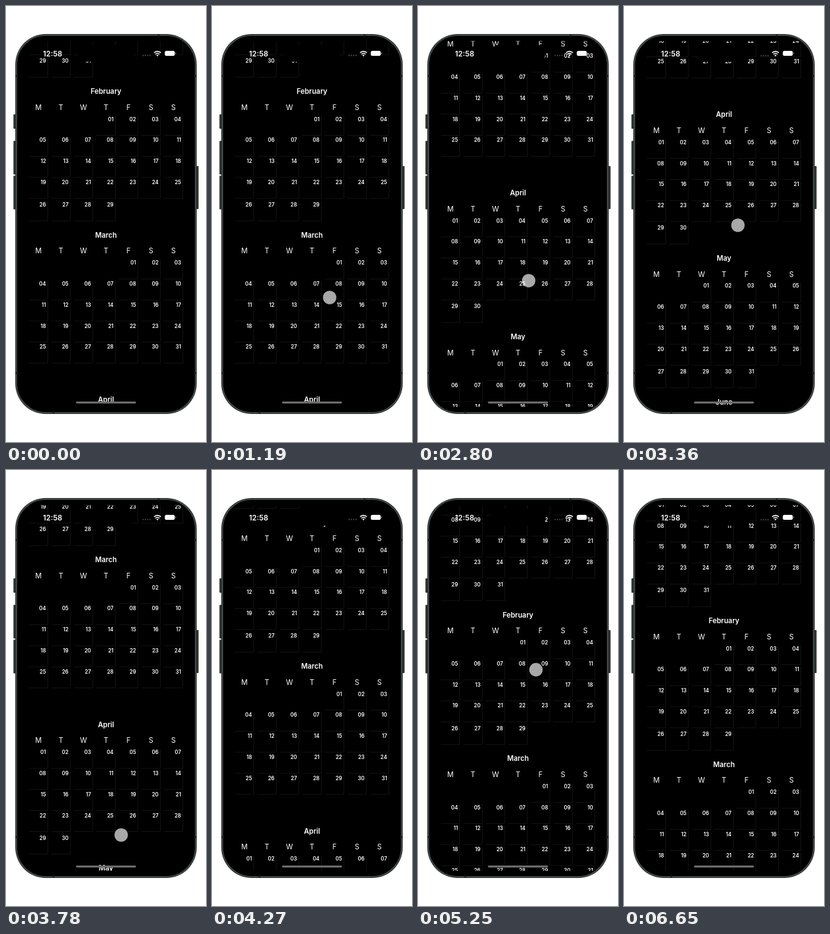
Recreate the animation shown at these times as an HTML page. Size 323 by 700 pixels, loop 7.76 s.

```html
<!DOCTYPE html>
<html lang="en">
<head>
<meta charset="utf-8">
<title>Calendar scroll</title>
<style>
  html, body { margin: 0; width: 100%; height: 100%; overflow: hidden; background: #fff; }
  svg { display: block; width: 323px; height: 700px; }
  text { font-family: Inter, Roboto, sans-serif; fill: #fff; }
  .title { font-size: 11.4px; font-weight: 600; text-anchor: middle; }
  .week { font-size: 11.4px; text-anchor: middle; }
  .day { font-size: 8.3px; font-weight: 600; text-anchor: end; }
  .clock { font-size: 11.8px; font-weight: 600; text-anchor: middle; }
  .cell { fill: none; stroke: #151515; }
</style>
</head>
<body>
<svg viewBox="0 0 323 700">
  <defs>
    <clipPath id="screen"><rect x="20" y="56.5" width="283" height="587"/></clipPath>
  </defs>

  <g id="phone">
    <g fill="#303433">
      <rect x="12" y="174" width="5" height="23" rx="1"/>
      <rect x="12" y="216.5" width="5" height="54" rx="1"/>
      <rect x="12" y="272.5" width="5" height="54" rx="1"/>
      <rect x="306" y="257" width="5" height="69" rx="1"/>
    </g>
    <rect x="15" y="45" width="293" height="610" rx="49" fill="#2b3230"/>
    <rect x="17" y="47" width="289" height="606" rx="47" fill="#000" stroke="#434847" stroke-width="2"/>
    <g fill="#1c2120">
      <rect x="15" y="111" width="4" height="3"/>
      <rect x="304" y="111" width="4" height="3"/>
      <rect x="15" y="588" width="4" height="3"/>
      <rect x="304" y="588" width="4" height="3"/>
      <rect x="245" y="45" width="3" height="4"/>
      <rect x="75" y="651" width="3" height="4"/>
    </g>
  </g>

  <g clip-path="url(#screen)"><g id="list"></g></g>

  <g id="status">
    <rect x="117" y="62.5" width="89" height="27" rx="13.5"/>
    <text class="clock" x="75.3" y="80.6">12:58</text>
    <path d="M221.5 79.5h12" stroke="#555" stroke-width="2" stroke-linecap="round" stroke-dasharray="0 3.7"/>
    <g fill="none" stroke="#fff" stroke-width="1.7">
      <path d="M239.2 75.2a7.6 7.6 0 0 1 10.8 0"/>
      <path d="M241.3 77.5a4.7 4.7 0 0 1 6.6 0"/>
    </g>
    <path d="M244.6 81l-1.8-2a2.6 2.6 0 0 1 3.6 0z" fill="#fff"/>
    <rect x="256.5" y="72" width="16" height="8" rx="2.5" fill="#fff"/>
    <rect x="273.3" y="74.7" width="1.2" height="2.6" rx=".6" fill="#888"/>
    <rect x="113" y="635" width="97" height="3.2" rx="1.6" fill="#6c6c6c"/>
  </g>

  <circle id="touch" r="10.8" fill="#fff" fill-opacity=".66"/>
</svg>

<script>
const LOOP = 7760, STEP = 70;
const COL = 36.35, ROW = 33.8;
const list = document.getElementById('list');
const touch = document.getElementById('touch');

function add(name, attrs, text = '') {
  const el = document.createElementNS('http://www.w3.org/2000/svg', name);
  for (const key in attrs) el.setAttribute(key, attrs[key]);
  el.textContent = text;
  list.append(el);
}

function label(cls, x, y, text, size = 11.4) {
  add('text', { class: cls, x, y: y + size * 0.364 }, text);
}

// Draws one month and returns its height
function drawMonth(y, name, start, days) {
  const rows = Math.floor((start + days) / 7) + 1;
  label('title', 161.5, y, name);
  [...'MTWTFSS'].forEach((d, i) => label('week', 52.4 + i * COL, y + 25.5, d));
  for (let d = 1; d <= days; d++) {
    const slot = start + d - 1, row = Math.floor(slot / 7), x = (slot % 7) * COL;
    const mid = y + 44.5 + row * ROW + (row === rows - 1 ? 2.3 : 0);
    add('path', { class: 'cell', d: `M${37 + x} ${mid + 26}h30.5v-31` });
    label('day', 64.6 + x, mid, String(d).padStart(2, '0'), 8.3);
  }
  return 61.7 + rows * ROW;
}

// Months of 2024, placed relative to the February title
const months = ['January', 'February', 'March', 'April', 'May', 'June'];
let titleY = -230.7;
months.forEach((name, m) => {
  const start = (new Date(2024, m, 1).getDay() + 6) % 7;
  titleY += drawMonth(titleY, name, start, new Date(2024, m + 1, 0).getDate());
});

const smooth = x => x * x * (3 - 2 * x);
const out = power => x => 1 - (1 - x) ** power;
const flick = out(3), pull = out(2.45);

// Key poses: [time, ease towards this pose, ...values]
const scroll = [
  [0, smooth, 137], [1190, smooth, 137],
  [1980, smooth, -178], [2660, smooth, -178],
  [3310, smooth, -321], [3500, smooth, -321],
  [4690, flick, 103], [5530, pull, 242]
];
const strokes = [
  [
    [560, smooth, 205, 452], [1190, smooth, 190, 468],
    [1980, smooth, 180, 153], [2170, smooth, 180, 153],
    [2660, smooth, 178, 453], [3310, smooth, 184, 352],
    [3500, smooth, 184, 352], [3780, smooth, 186, 586]
  ],
  [
    [4690, smooth, 184, 191], [5530, pull, 191, 330],
    [5600, smooth, 191, 330], [5950, smooth, 169, 291],
    [6090, smooth, 169, 291], [6580, smooth, 205, 461]
  ]
];

function pose(keys, t) {
  const next = keys.findIndex(k => k[0] > t);
  if (next < 0) return keys.at(-1).slice(2);
  const [t0, , ...from] = keys[next - 1], [t1, ease, ...to] = keys[next];
  const p = ease((t - t0) / (t1 - t0));
  return from.map((v, i) => v + (to[i] - v) * p);
}

function render(t) {
  list.setAttribute('transform', `translate(0 ${pose(scroll, t)[0].toFixed(2)})`);
  const stroke = strokes.find(s => t >= s[0][0] && t <= s.at(-1)[0]);
  touch.setAttribute('visibility', stroke ? 'visible' : 'hidden');
  if (stroke) {
    const [x, y] = pose(stroke, t);
    touch.setAttribute('cx', x);
    touch.setAttribute('cy', y);
  }
}

const begin = performance.now();
function tick() {
  const t = (performance.now() - begin) % LOOP;
  render(Math.floor(t / STEP) * STEP);
  requestAnimationFrame(tick);
}
tick();
</script>
</body>
</html>
```
